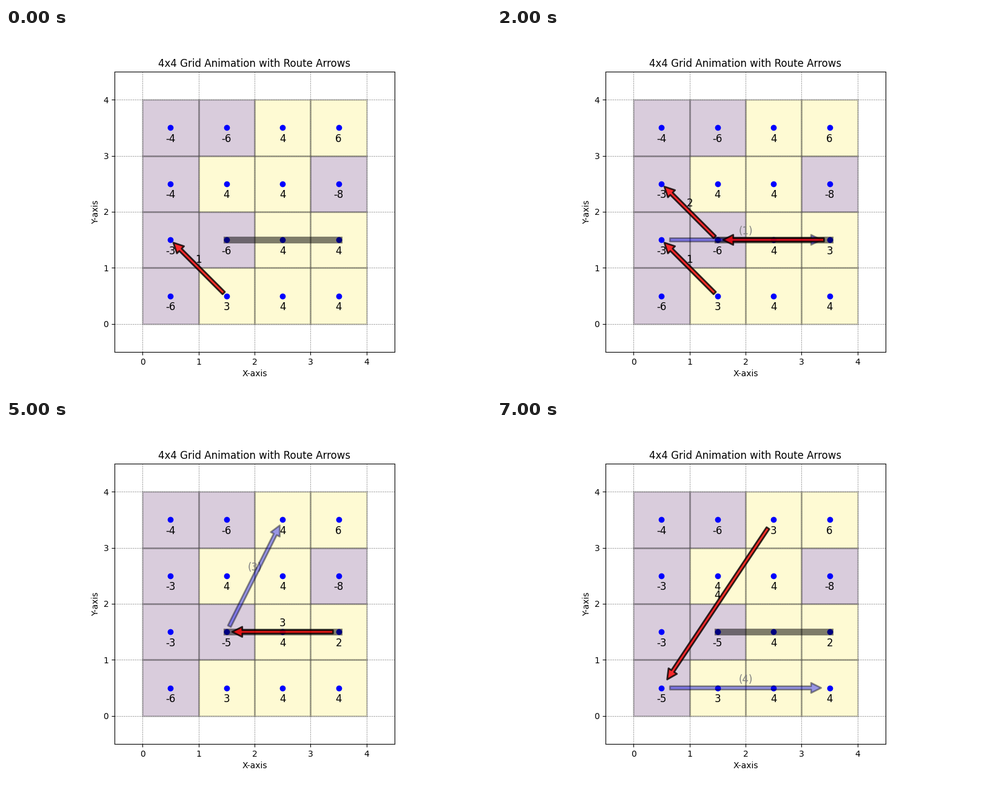
A matplotlib script for the animation above (8 s loop, 800x600 px).

```python
import matplotlib.pyplot as plt
from matplotlib.animation import FuncAnimation
from matplotlib.patches import Rectangle

STEPS = 8
START = [[-6, 3, 4, 4],
         [-3, -6, 4, 4],
         [-4, 4, 4, -8],
         [-4, -6, 4, 6]]  # bottom row first

# (first step, last step, from cell, to cell, label, planned)
ROUTES = [
    (0, 2, (1, 0), (0, 1), "1", False),
    (1, 2, (0, 1), (3, 1), "(1)", True),
    (2, 3, (3, 1), (1, 1), "", False),
    (2, 3, (1, 1), (0, 2), "2", False),
    (3, 4, (0, 2), (3, 1), "(2)", True),
    (4, 5, (3, 1), (1, 1), "3", False),
    (5, 6, (1, 1), (2, 3), "(3)", True),
    (6, 7, (2, 3), (0, 0), "4", False),
    (7, 7, (0, 0), (3, 0), "(4)", True),
]
# step -> cells whose value moves one closer to zero
HITS = {2: [(0, 2), (3, 1)], 4: [(1, 1), (3, 1)], 6: [(2, 3), (0, 0)]}

fig, ax = plt.subplots(figsize=(8, 6), dpi=100)
ax.set_xlim(-0.5, 4.5)
ax.set_ylim(-0.5, 4.5)
ax.set_aspect("equal")
ax.set_xticks(range(5))
ax.set_yticks(range(5))
ax.grid(True, color="gray", linestyle="--", linewidth=0.5)
ax.set_title("4x4 Grid Animation with Route Arrows")
ax.set_xlabel("X-axis")
ax.set_ylabel("Y-axis")


def center(cell):
    return cell[0] + 0.5, cell[1] + 0.5


def put_text(x, y, text, color="black"):
    return ax.text(x, y, text, ha="center", va="center", fontsize=12, color=color)


values = {}
for row in range(4):
    for col in range(4):
        value = START[row][col]
        shade = plt.cm.viridis(0.0 if value < 0 else 1.0)
        ax.add_patch(Rectangle((col, row), 1, 1, facecolor=shade,
                               edgecolor="black", linewidth=2, alpha=0.2))
        x, y = center((col, row))
        ax.plot(x, y, "bo")
        values[col, row] = put_text(x, y - 0.2, "")

# wall across the second row
ax.plot([1.5, 3.5], [1.5, 1.5], color="black", linewidth=8, alpha=0.5)


def add_route(a, b, label, planned):
    (x0, y0), (x1, y1) = center(a), center(b)
    text = put_text((x0 + x1) / 2, (y0 + y1) / 2 + 0.15, label,
                    "gray" if planned else "black")
    arrow = ax.annotate("", xy=(x1, y1), xytext=(x0, y0), arrowprops=dict(
        facecolor="blue" if planned else "red", edgecolor="black",
        linewidth=2, alpha=0.4 if planned else 0.8,
        shrink=0.05, width=4, headwidth=12, headlength=12))
    return text, arrow


routes = [(first, last, add_route(*spec)) for first, last, *spec in ROUTES]


def update(step):
    for (col, row), text in values.items():
        value = START[row][col]
        hits = sum((col, row) in cells for at, cells in HITS.items() if at <= step)
        text.set_text(str(value + hits if value < 0 else value - hits))
    for first, last, artists in routes:
        for artist in artists:
            artist.set_visible(first <= step <= last)
    return []


anim = FuncAnimation(fig, update, frames=STEPS, interval=1000, repeat=True,
                     init_func=lambda: update(0))
plt.show()
```
